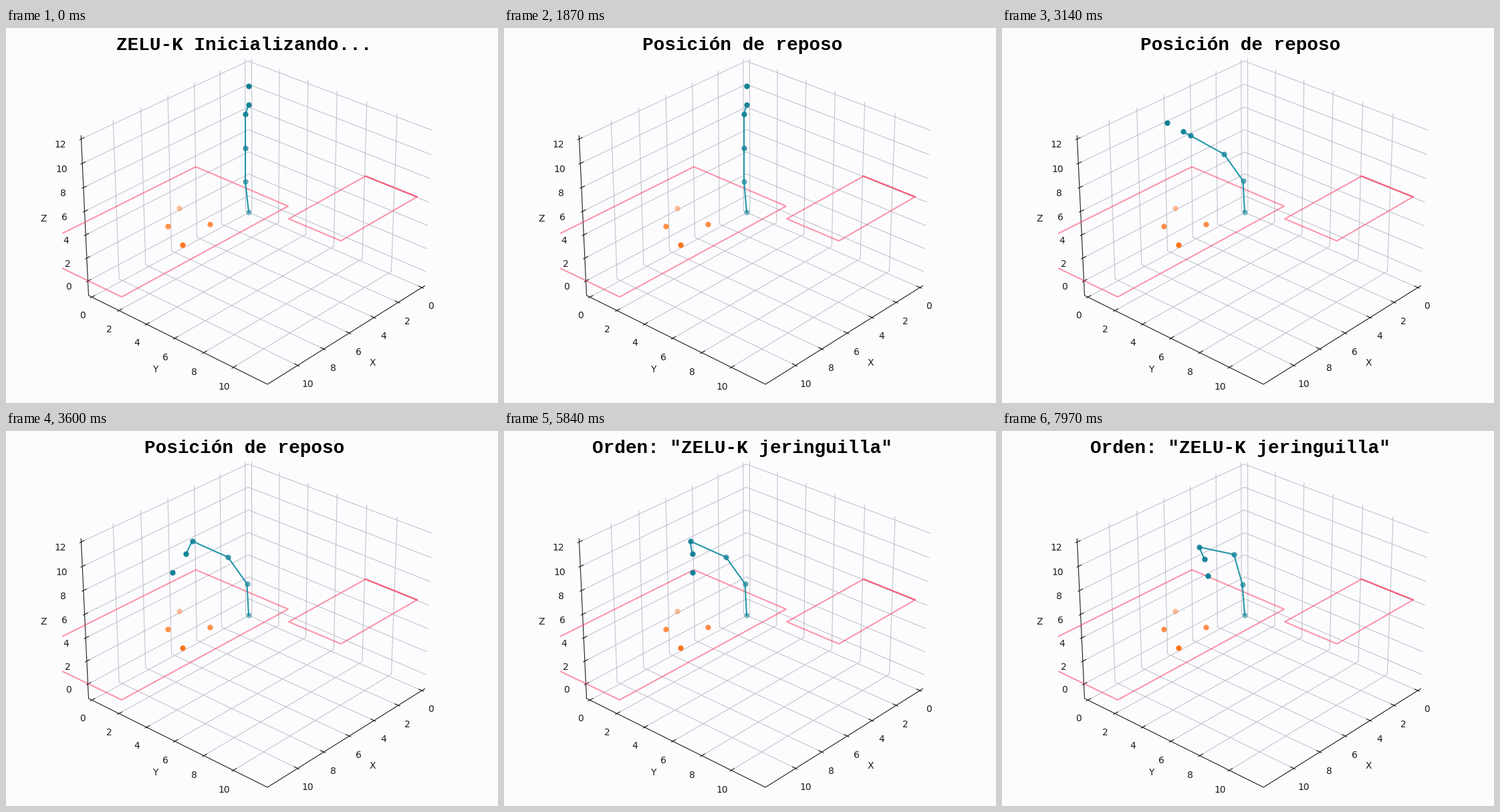
A matplotlib script that plays this animation: 736x562 px, repeating every 8000 ms.

```python
import numpy as np
import matplotlib.pyplot as plt
from matplotlib.animation import FuncAnimation
from matplotlib.patches import Rectangle

W, H, DPI = 736, 562, 100
STEP, LOOP = 32, 8000

PAPER, INK = "#fcfcfe", "#1a1a1c"
GRID, TABLE = "#c2c2cc", "#ff2f55"
LINK, JOINT = "#2296a8", "#0f8096"

# Perspective camera: screen centre, scale and viewing angles
CX, CY, SCALE, DIST = 376, 276.7, 3057, 10
AZ, EL = np.radians(41.8), np.radians(29)
LO, HI = -0.25, 12.25
ZLO, ZHI = -1.27, 12.27


def project(x, y, z):
    """Room coordinates to stage pixels."""
    x, y = (x - 6) * 0.09524, (y - 6) * 0.09524
    z = (z - 5.5) * 0.06593
    right = y * np.cos(AZ) - x * np.sin(AZ)
    near = x * np.cos(AZ) + y * np.sin(AZ)
    up = z * np.cos(EL) - near * np.sin(EL)
    depth = DIST - near * np.cos(EL) - z * np.sin(EL)
    return np.array([CX + SCALE * right / depth, CY - SCALE * up / depth])


fig = plt.figure(figsize=(W / DPI, H / DPI), dpi=DPI, facecolor=PAPER)
ax = fig.add_axes([0, 0, 1, 1])
ax.set(xlim=(0, W), ylim=(H, 0))
ax.axis("off")


def path3d(*points, **style):
    xs, ys = zip(*(project(*p) for p in points))
    ax.plot(xs, ys, **style)


def label(x, y, s):
    ax.text(x, y, s, size=10, color=INK, family="DejaVu Sans",
            ha="center", va="center_baseline")


def draw_room():
    grid = dict(color=GRID, lw=0.8, zorder=1)
    edge = dict(color=INK, lw=0.8, zorder=2)
    for v in range(0, 12, 2):
        path3d((v, HI, ZLO), (v, LO, ZLO), (v, LO, ZHI), **grid)
        path3d((HI, v, ZLO), (LO, v, ZLO), (LO, v, ZHI), **grid)
    for v in range(0, 13, 2):
        path3d((HI, LO, v), (LO, LO, v), (LO, HI, v), **grid)

    path3d((LO, HI, ZLO), (HI, HI, ZLO), (HI, LO, ZLO), (HI, LO, ZHI), **edge)

    inner, outer = HI - 0.21, HI + 0.1
    for v in range(0, 12, 2):
        path3d((v, inner, ZLO), (v, outer, ZLO), **edge)
        path3d((inner, v, ZLO), (outer, v, ZLO), **edge)
        x, y = project(v, HI, ZLO)
        label(x + 13.5 + 0.1 * v, y + 27, v)
        x, y = project(HI, v, ZLO)
        label(x - 14.3, y + 26.3 + 0.15 * v, v)
    for v in range(0, 13, 2):
        path3d((inner, LO, v), (outer, LO, v), **edge)
        x, y = project(HI, LO, v)
        label(x - 28.5 - 0.2 * v, y + 7.5, v)
    label(548, 500, "X")
    label(223, 510, "Y")
    label(56, 284, "Z")


def draw_tables():
    style = dict(color=TABLE, alpha=0.5, lw=1.5, zorder=3)
    clip = Rectangle((84, 0), W, H, transform=ax.transData)
    shapes = [
        [(-116, 408), (284, 208), (422, 267), (173, 403), (-34, 303)],
        [(538, 222), (615, 253), (501, 319), (423, 286), (538, 222)],
        [(538, 222), (615, 253)],
    ]
    for pts in shapes:
        line, = ax.plot(*zip(*pts), **style)
        line.set_clip_path(clip)


def dots(color, alphas):
    return [ax.plot([], [], "o", ms=6, mew=0, color=color, alpha=a,
                    zorder=5)[0] for a in alphas]


draw_room()
draw_tables()

targets = [(259, 270), (242, 297), (305, 294), (264, 325)]
for dot, (x, y) in zip(dots("#ff741c", [0.45, 0.8, 0.8, 1]), targets):
    dot.set_data([x], [y])

arm, = ax.plot([], [], color=LINK, lw=1.5, zorder=4)
joints = dots(JOINT, [0.5, 0.65, 0.78, 0.9, 0.95, 1])
title = ax.text(356.5, 33, "", size=20, weight="bold", color="black",
                family="Liberation Mono", ha="center", va="baseline")

TITLES = [
    (0, "ZELU-K Inicializando..."),
    (1650, "Posición de reposo"),
    (3740, "Esperando instrucción..."),
    (5500, 'Orden: "ZELU-K jeringuilla"'),
]

# Joint positions after each move: base, shoulder, elbow, wrist, ...
BASE = 363 + 276j
UPRIGHT = [358 + 230j, 358 + 180j, 358 + 129j, 363 + 115j, 363 + 87j]
TURNED = [361 + 229j, 361 + 179j, 361 + 128j, 363 + 115j, 363 + 87j]
LEANING = [360.5 + 229j, 333 + 189j, 304 + 148j, 298 + 138j, 281.5 + 115j]
BENT = [360.5 + 229j, 332 + 189j, 278.5 + 165j, 267 + 160j, 242 + 149j]
FOLDING = [360.5 + 229j, 332 + 189j, 278.5 + 165j, 270.5 + 185j, 252 + 214j]
RESTING = [360.5 + 229j, 332 + 189j, 278.5 + 165j, 281.5 + 184j, 282 + 212j]
AIMED = [359 + 229.5j, 335 + 192.5j, 288.5 + 174j, 293 + 192.5j, 293.5 + 220.5j]
RAISED = [359.5 + 229.5j, 347 + 185j, 295 + 174j, 302.5 + 191.5j, 308 + 217j]

POSES = [
    (0, UPRIGHT), (1670, UPRIGHT), (2185, TURNED), (2700, LEANING),
    (3215, BENT), (3600, FOLDING), (3730, RESTING), (6480, RESTING),
    (7240, AIMED), (LOOP - STEP, RAISED),
]


def links(pose):
    return np.diff(np.array([BASE] + pose))


def arm_at(t):
    """Swing every link between the two poses around time t."""
    i = max(k for k in range(len(POSES) - 1) if POSES[k][0] <= t)
    (t0, p0), (t1, p1) = POSES[i], POSES[i + 1]
    u = min(1, (t - t0) / (t1 - t0))
    a, b = links(p0), links(p1)
    length = (1 - u) * np.abs(a) + u * np.abs(b)
    angle = np.angle(a) + u * np.angle(b / a)
    return BASE + np.concatenate([[0], np.cumsum(length * np.exp(1j * angle))])


def update(i):
    t = i * STEP
    p = arm_at(t)
    arm.set_data(p.real[:5], p.imag[:5])
    for dot, q in zip(joints, p):
        dot.set_data([q.real], [q.imag])
    title.set_text([s for start, s in TITLES if start <= t][-1])
    return [arm, title, *joints]


anim = FuncAnimation(fig, update, frames=LOOP // STEP, interval=STEP,
                     repeat=True, repeat_delay=0, blit=False)
plt.show()
```
